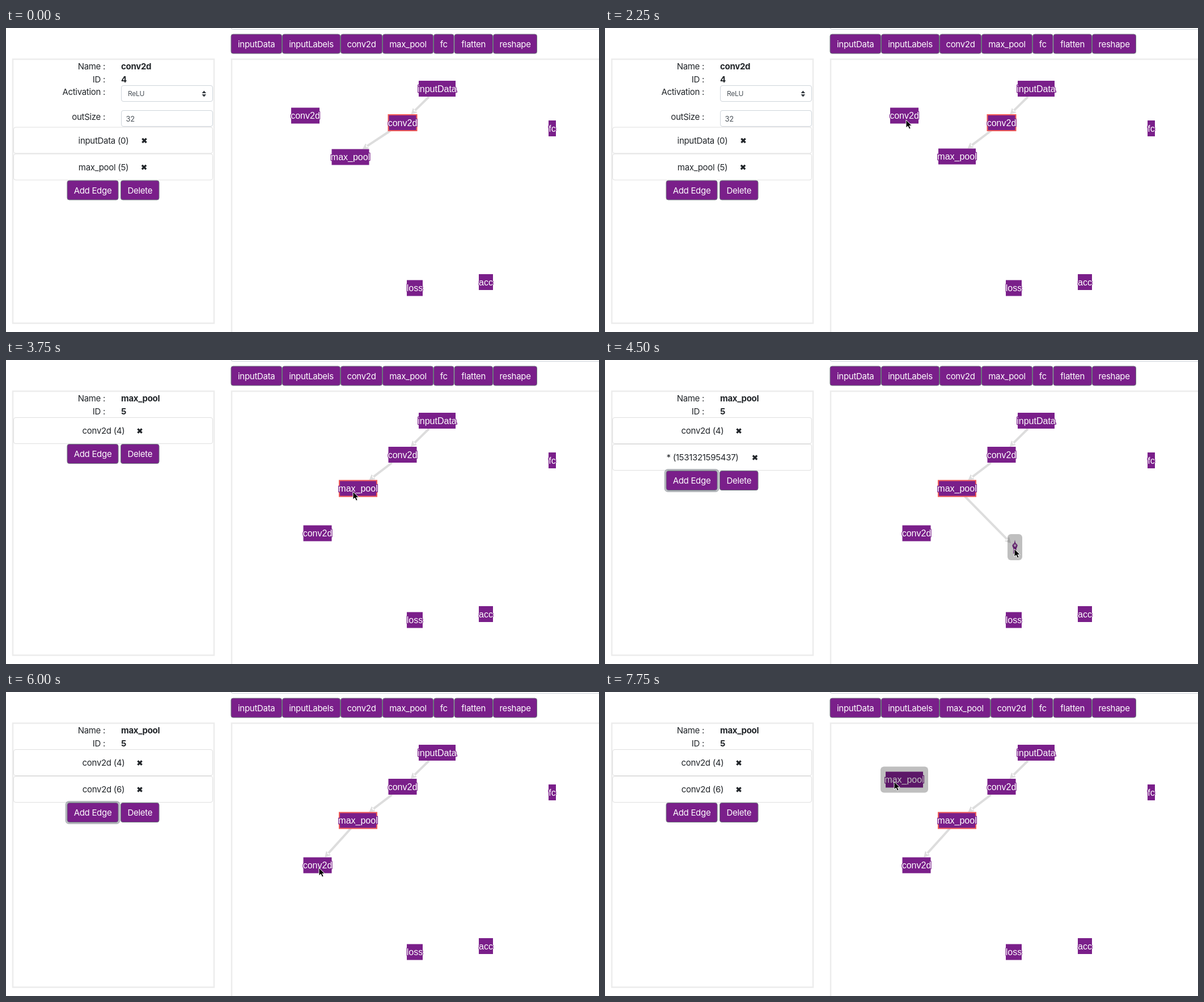
Animation, 1046 px wide and 536 px high, one loop 8 s. Source, as an HTML page:

```html
<!DOCTYPE html>
<html lang="en">
<head>
<meta charset="utf-8">
<title>Network graph editor</title>
<style>
  html, body { margin: 0; width: 100%; height: 100%; overflow: hidden; background: #fff; }
  svg { display: block; width: 1046px; height: 536px; }
  text { font: 15px Inter, sans-serif; letter-spacing: -.02em; fill: #212529; }
  .bold { font-weight: 700; }
  .mid { text-anchor: middle; }
  .end { text-anchor: end; }
  .light { fill: #fff; }
  .small { font-size: 12px; fill: #495057; }
  .field { font-size: 13px; fill: #495057; }
  .label { font: 16px "Liberation Sans", Arial, sans-serif; letter-spacing: 0; fill: #fff;
           stroke: #7a1f8a; stroke-width: 2.5px; paint-order: stroke; text-anchor: middle; }
</style>
</head>
<body>
<svg id="stage" viewBox="0 0 1046 536"></svg>
<script>
const PURPLE = '#7a1f8a', STEP = 250, LOOP = 8000;
const stage = document.getElementById('stage');

// Pointer path: [step, x, y], linear between entries.
const pointerPath = [
  [1, 692, 211], [3, 630, 228], [4, 630, 228], [6, 643, 228], [9, 531, 162],
  [10, 521, 205], [11, 532, 270], [12, 552, 313], [14, 612, 232], [15, 612, 232],
  [16, 153, 166], [18, 722, 333], [19, 673, 333], [20, 645, 281], [21, 632, 267],
  [22, 600, 291], [23, 550, 308], [24, 552, 310], [25, 620, 190], [26, 700, 50],
  [27, 707, 24], [28, 690, 40], [29, 590, 100], [30, 510, 158], [31, 510, 158]
];

function pointerAt(step) {
  const next = pointerPath.findIndex(key => key[0] >= step);
  const b = pointerPath[next], a = pointerPath[Math.max(0, next - 1)];
  const k = b[0] === a[0] ? 0 : (step - a[0]) / (b[0] - a[0]);
  return { x: a[1] + (b[1] - a[1]) * k, y: a[2] + (b[2] - a[2]) * k };
}

const text = (x, y, content, cls = '') => `<text x="${x}" y="${y}" class="${cls}">${content}</text>`;

const box = (x, y, w, h, stroke, { fill = 'none', width = 1, radius = 3.5 } = {}) =>
  `<rect x="${x}" y="${y}" width="${w}" height="${h}" rx="${radius}" fill="${fill}" stroke="${stroke}" stroke-width="${width}"/>`;

function button(x, y, w, label, focused) {
  const ring = focused
    ? box(x - 1.5, y - 1.5, w + 3, 38, 'rgba(108,117,125,.5)', { width: 3, radius: 5 }) : '';
  return ring + box(x + .5, y + .5, w - 1, 34, '#6c757d', { fill: PURPLE }) +
    text(x + w / 2, y + 23, label, 'mid light');
}

function toolbar(swapped, focused) {
  const widths = { inputData: 90.5, inputLabels: 103, conv2d: 74, max_pool: 90, fc: 36.5, flatten: 68.5, reshape: 78 };
  const pair = swapped ? ['max_pool', 'conv2d'] : ['conv2d', 'max_pool'];
  let x = 396.5;
  return ['inputData', 'inputLabels', ...pair, 'fc', 'flatten', 'reshape'].map(name => {
    const drawn = button(x, 10.5, widths[name], name, name === focused);
    x += widths[name];
    return drawn;
  }).join('');
}

const cross = (x, y) =>
  `<path d="M${x - 3.6} ${y - 3.6}l7.2 7.2m0 -7.2l-7.2 7.2" stroke="#212529" stroke-width="3.4"/>`;

const connection = (y, label, crossX) =>
  box(13.5, y + .5, 351, 46, '#dfdfdf') + text(172, y + 29, label, 'mid') + cross(crossX, y + 24);

function panel(name, id, connections, withFields, addFocused) {
  let out = text(175, 73, 'Name :', 'end') + text(203, 73, name, 'bold') +
    text(175, 95.5, 'ID :', 'end') + text(203, 95.5, id, 'bold');
  let y = 101;
  if (withFields) {
    out += text(175, 118, 'Activation :', 'end') + box(203.5, 101.5, 161, 28, '#ced4da') +
      text(215, 120, 'ReLU', 'small') +
      '<path d="M345.5 115l3.8 -4.5 3.8 4.5zM345.5 117l3.8 4.5 3.8 -4.5z" fill="#343a40"/>' +
      text(175, 162, 'outSize :', 'end') + box(203.5, 145.5, 161, 28, '#ced4da') +
      text(211.5, 164.5, '32', 'field');
    y = 174.5;
  }
  for (const [label, crossX] of connections) {
    out += connection(y, label, crossX);
    y += 47;
  }
  return out + button(107.5, y, 91, 'Add Edge', addFocused) + button(202, y, 68.5, 'Delete');
}

const makeNode = (name, x, y, w, options) => ({ name, x, y, w, h: 28, ...options });

function drawNode({ name, x, y, w, h, selected, pressed, star }) {
  let shape;
  if (star) {
    const points = Array.from({ length: 10 }, (_, i) => {
      const r = i % 2 ? .5 : 1, angle = i * Math.PI / 5;
      return `${x + 5 * r * Math.sin(angle)},${y + 1 - 14 * r * Math.cos(angle)}`;
    });
    shape = `<polygon points="${points.join(' ')}" fill="${PURPLE}"/>`;
  } else {
    shape = box(x - w / 2, y - h / 2, w, h, selected ? '#f05b57' : 'none', { fill: PURPLE, width: 2, radius: 0 });
  }
  const overlay = pressed
    ? box(x - w / 2 - 9, y - h / 2 - 9, w + 18, h + 18, 'none', { fill: 'rgba(0,0,0,.25)', radius: 6 }) : '';
  return shape + text(x, y + 5.5, name, 'label') + overlay;
}

// Arrow between the borders of two nodes along the line of their centres.
function drawEdge(from, to) {
  const dx = to.x - from.x, dy = to.y - from.y, length = Math.hypot(dx, dy);
  if (length < 30) return '';
  const reach = node => node.star ? 7 / Math.abs(dy / length)
    : Math.min(node.w / 2 / Math.abs(dx / length), node.h / 2 / Math.abs(dy / length));
  const start = reach(from), tip = length - reach(to) - (to.selected ? 1 : 0);
  const angle = Math.atan2(dy, dx) * 180 / Math.PI;
  return `<g transform="translate(${from.x} ${from.y}) rotate(${angle})" fill="#ddd">
    <path d="M${start} -2H${tip - 8}V2H${start}zM${tip} 0l-10 -5.5v11z"/></g>`;
}

function graph(step, pointer) {
  const poolSelected = step >= 15;
  const input = makeNode('inputData', 760.5, 107, 65);
  const conv = makeNode('conv2d', 699.5, 167, 50, { selected: !poolSelected });
  const pool = makeNode('max_pool', step < 5 ? 607.5 : step < 6 ? 614 : 621, step < 5 ? 227.5 : 226.5, 66,
    { selected: poolSelected, pressed: step === 5 || step === 6 || step === 14 });
  const dragging = step >= 10 && step <= 12;
  const loose = makeNode('conv2d', 528, 154.5, 50, { pressed: dragging });
  if (dragging) Object.assign(loose, { x: pointer.x - 2.5, y: pointer.y - 8 });
  if (step >= 12) Object.assign(loose, { x: 549.5, y: 305.5 });

  const nodes = [input, conv, pool, loose, makeNode('fc', 963.5, 177, 13),
    makeNode('loss', 721, 458.5, 28), makeNode('acc', 846.5, 448, 25)];
  const edges = [[input, conv], [conv, pool]];

  if (step >= 16 && step < 24) {
    const star = makeNode('*', 721, 327, 8, { star: true, pressed: step >= 18 && step !== 21 });
    if (step >= 18) Object.assign(star, { x: pointer.x + 1, y: pointer.y - 3 });
    if (step === 21) Object.assign(star, { x: 639.5, y: 273 });
    nodes.push(star);
    edges.push([pool, star]);
  }
  if (step >= 24) edges.push([pool, loose]);
  if (step >= 28) nodes.push(makeNode('max_pool', 528, 154.5, 66, { pressed: step === 31 }));

  return edges.map(([from, to]) => drawEdge(from, to)).join('') + nodes.map(drawNode).join('');
}

const drawPointer = ({ x, y }) =>
  `<path transform="translate(${x} ${y})" d="M0 0V14L3.3 11 5.6 16.2 8.2 15 5.9 10.2H10.2Z" fill="#000" stroke="#fff"/>`;

const frameLines =
  box(397, -20, 700, 22.5, '#ced4da') +
  box(12, 55, 355, 465.5, '#ececec', { width: 2.5, radius: 0 }) +
  box(398, 55, 700, 600, '#ececec', { width: 2.5, radius: 0 });

function sidebar(step) {
  if (step < 15) return panel('conv2d', 4, [['inputData (0)', 244], ['max_pool (5)', 243.5]], true);
  const connections = [['conv2d (4)', 236]];
  if (step >= 24) connections.push(['conv2d (6)', 236]);
  else if (step >= 16) connections.push(['* (1531321595437)', 264.5]);
  return panel('max_pool', 5, connections, false, step >= 16 && step < 25);
}

let shown = -1;
function render(now) {
  const step = Math.floor(now % LOOP / STEP);
  if (step !== shown) {
    shown = step;
    const pointer = pointerAt(step);
    stage.innerHTML = frameLines + toolbar(step >= 28, step === 27 ? 'max_pool' : '') +
      sidebar(step) + graph(step, pointer) + (step > 0 ? drawPointer(pointer) : '');
  }
  requestAnimationFrame(render);
}
render(performance.now());
</script>
</body>
</html>
```
